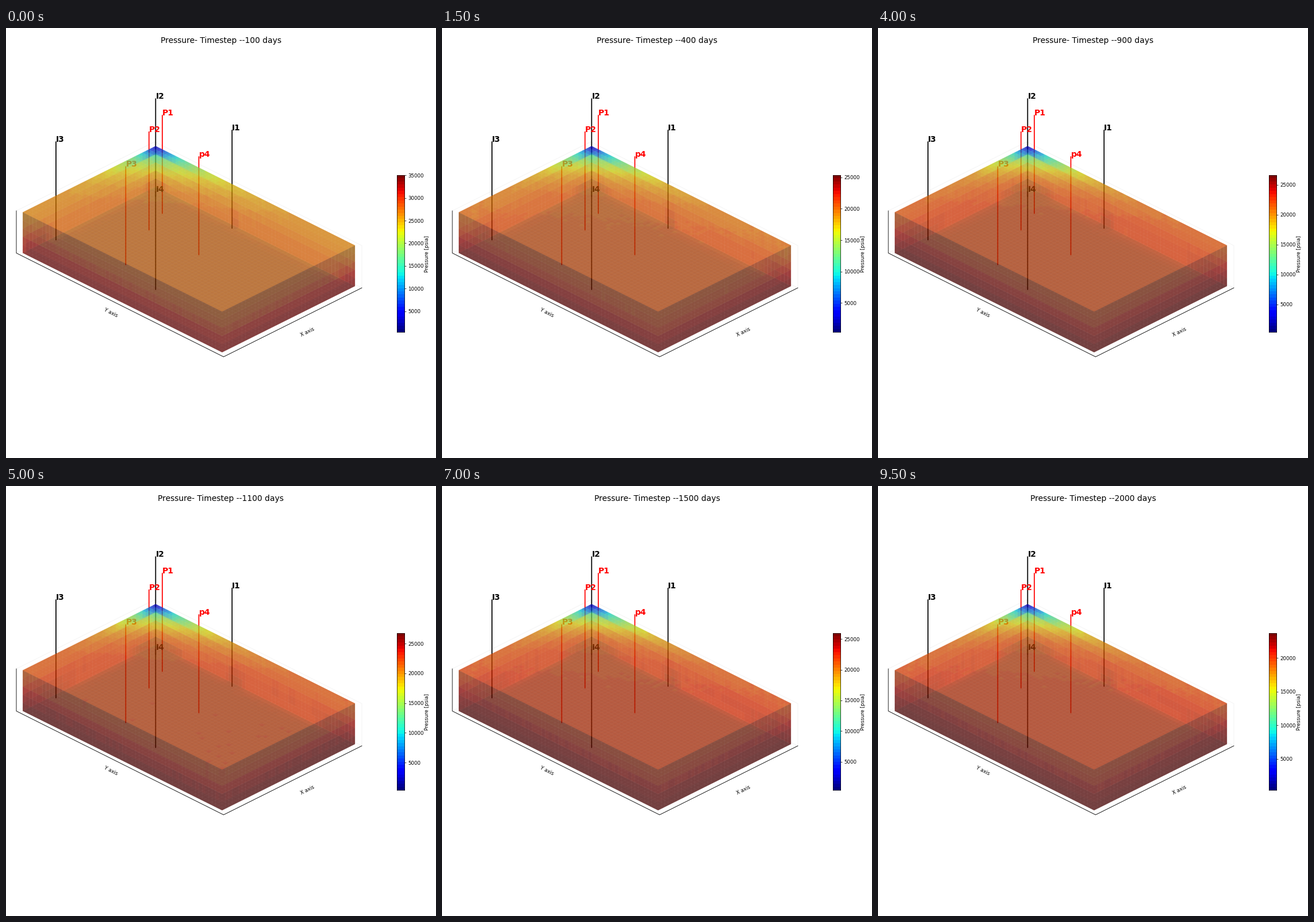
Recreate the animation shown at these times as a matplotlib script. Size 748 by 748 pixels, loop 10 s.

```python
import numpy as np
import matplotlib.pyplot as plt
from matplotlib.animation import FuncAnimation
from matplotlib.collections import PolyCollection

STAGE = 748
NX, NY, NZ = SHAPE = (40, 60, 5)
ALPHA = 0.5
CMAP = plt.get_cmap("jet", 50)

# (x, y) cell of each well
INJECTORS = {"I1": (1, 24), "I2": (3, 3), "I3": (31, 1), "I4": (31, 31)}
PRODUCERS = {"P1": (7, 9), "P2": (14, 12), "P3": (28, 19), "p4": (14, 27)}

DAYS = [100, 200, 300, 400, 600, 900, 1300, 1700, 2000]
P_MAX = [35010, 29000, 26500, 25320, 25600, 26590, 26840, 25017, 23680]
P_MIN = 340

# Normalised pressure by depth at the start and once settled
EARLY = np.array([0.755, 0.770, 0.820, 0.890, 0.930])
LATE = np.array([0.825, 0.845, 0.900, 0.945, 0.975])
DIP = np.array([1.0, 0.35, 0.2, 0.1, 0.0])
WALL_DROP = np.array([0.0, 0.0, 0.01, 0.04, 0.08])
# x, y and radius of the high-pressure zones along the back walls
ZONES = [(0, 0, 8), (36, 0, 10), (0, 60, 11), (0, 24, 2.5)]


def project(x, y, z):
    """Isometric view: z counts layers upward."""
    px = 260.3 + 5.78 * (y - x)
    py = 276.2 + 2.88 * (x + y) - 14.18 * z
    return np.stack([px, py], axis=-1)


def build_faces():
    """Outer cell faces from back to front: quads, cell indices, shades."""
    cells = np.argwhere(np.ones(SHAPE, bool))
    sides = [(2, 0, 0.533), (0, 0, 0.883), (1, 0, 0.883),
             (0, 1, 0.417), (1, 1, 0.417), (2, 1, 0.767)]
    quads, owners, shades = [], [], []
    for axis, far, shade in sides:
        own = cells[cells[:, axis] == far * (SHAPE[axis] - 1)]
        a, b = [n for n in range(3) if n != axis]
        corners = np.repeat(own[:, None, :], 4, axis=1)
        corners[..., axis] += far
        corners[..., a] += np.array([0, 1, 1, 0])
        corners[..., b] += np.array([0, 0, 1, 1])
        quads.append(project(*np.moveaxis(corners, -1, 0)))
        owners.append(own)
        shades.append(np.full(len(own), shade))
    return np.concatenate(quads), np.concatenate(owners), np.concatenate(shades)


QUADS, OWNERS, SHADES = build_faces()
X, Y = OWNERS[:, 0] + 0.5, OWNERS[:, 1] + 0.5
DEPTH = NZ - 1 - OWNERS[:, 2]
GRAIN = np.random.default_rng(4).normal(0, 0.004, (NX, NY))[OWNERS[:, 0], OWNERS[:, 1]]
NEAR_WALL = np.exp(-(np.minimum(X, Y) - 0.5))
SINK = np.exp(-(X + Y / 1.45) / 7.2)


def face_colors(days):
    settled = np.interp(days, [100, 400, 600, 900, 1300], [0, 0.42, 0.62, 0.8, 1])
    level = (EARLY + (LATE - EARLY) * settled)[DEPTH]
    grow = 0.4 + 0.6 * settled
    zone = np.zeros(len(X))
    for zx, zy, radius in ZONES:
        d = np.hypot(X - zx, Y - zy) / (radius * grow)
        zone = np.maximum(zone, np.exp(-d ** 4))
    value = level * (1 - DIP[DEPTH] * SINK)
    value = value - WALL_DROP[DEPTH] * NEAR_WALL * (1 - zone)
    value = value + GRAIN * (0.3 + 0.7 * NEAR_WALL)
    rgba = CMAP(np.clip(value, 0, 1))
    rgba[:, :3] *= SHADES[:, None]
    rgba[:, 3] = ALPHA
    return rgba


fig = plt.figure(figsize=(12, 12), dpi=STAGE / 12, facecolor="white")
ax = fig.add_axes([0, 0, 1, 1])
ax.set_xlim(0, STAGE)
ax.set_ylim(STAGE, 0)
ax.axis("off")
title = fig.suptitle("", fontsize=16)


def polyline(points, color, width, order):
    ax.plot(*zip(*points), color=color, lw=width, zorder=order, snap=False)


# Axes box: faint back edges, black front edges
left, front, right, back = (18, 391.5), (378.5, 572), (619, 452), (258.5, 271.5)
rise = 73.5
up = lambda p: (p[0], p[1] - rise)
polyline([up(left), up(back), up(right), right, back, left], "0.94", 0.8, 0.4)
polyline([up(back), back], "0.94", 0.8, 0.4)
polyline([up(left), left, front, right], "black", 1.0, 0.5)
label = dict(ha="center", va="center", fontsize=10)
ax.text(524, 529, "X axis", rotation=26.5, **label)
ax.text(182, 495, "Y axis", rotation=-26.5, **label)
ax.text(733, 393, "Pressure [psia]", rotation=90, **label)

for wells, color in ((INJECTORS, "black"), (PRODUCERS, "red")):
    for name, (wx, wy) in wells.items():
        foot, head = project(wx, wy, 0), project(wx, wy, 12)
        polyline([foot, head], color, 2, 1)
        ax.text(*head, name, color=color, fontsize=16, weight="bold", zorder=1.5)

block = PolyCollection(QUADS, edgecolors="none", linewidths=0, zorder=2)
ax.add_collection(block, autolim=False)

bar = fig.add_axes([679.5 / STAGE, 1 - 529.3 / STAGE, 13.65 / STAGE, 273 / STAGE])
ramp = bar.imshow(np.linspace(0, 1, CMAP.N)[:, None], cmap=CMAP, origin="lower",
                  aspect="auto", interpolation="nearest")
bar.set_xticks([])
bar.yaxis.tick_right()


def update(n):
    days = 100 * (n + 1)
    p_max = np.interp(days, DAYS, P_MAX)
    title.set_text(f"Pressure- Timestep --{days} days")
    block.set_facecolor(face_colors(days))
    ramp.set_extent((0, 1, P_MIN, p_max))
    bar.set_yticks(np.arange(5000, p_max, 5000))
    bar.set_ylim(P_MIN, p_max)
    return title, block, ramp


anim = FuncAnimation(fig, update, frames=20, interval=500, repeat=True,
                     repeat_delay=0, blit=False)
plt.show()
```
